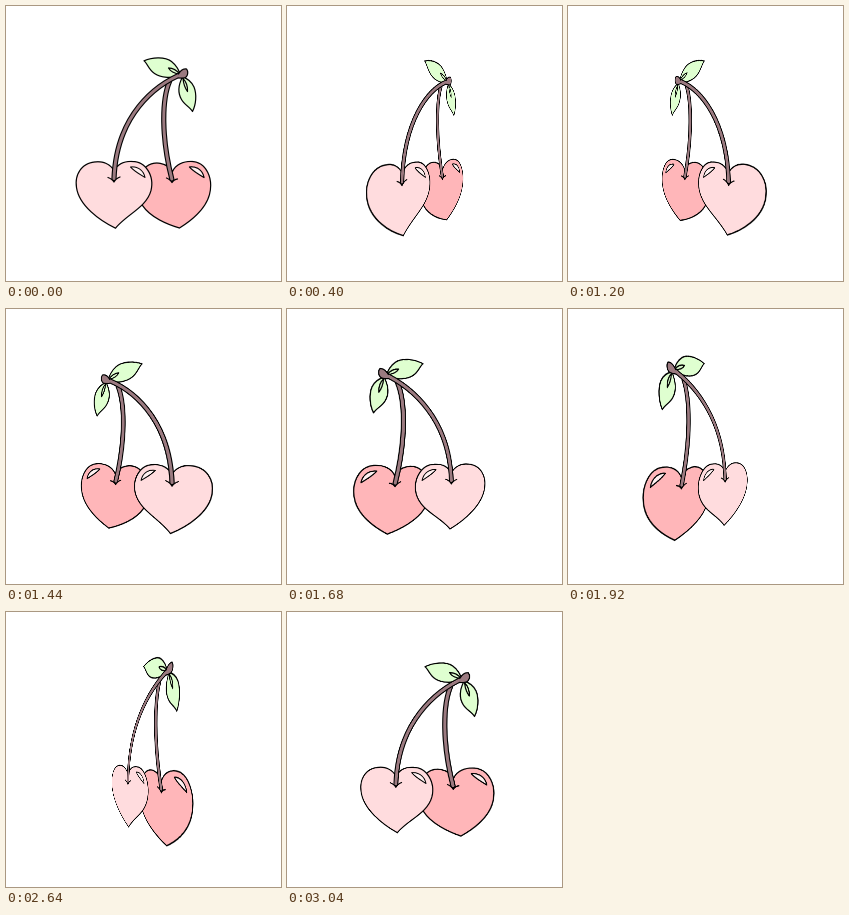
These frames come from a looping animation (275 px wide and 275 px high, 3120 ms). An HTML page:

```html
<!DOCTYPE html>
<html lang="en">
<head>
<meta charset="utf-8">
<title>Turning cherries</title>
<style>
  html, body { margin: 0; width: 100%; height: 100%; overflow: hidden; background: #fff; }
  .stage { position: relative; left: -1px; width: 275px; height: 275px; perspective: 245px; }
  /* Drawn at double size and halved in the transform, for crisp edges. */
  svg {
    position: absolute; left: -137.5px; top: -137.5px; width: 550px; height: 550px;
    transform: scale(.5); will-change: transform;
    fill: none; stroke: #000; stroke-width: 1.2; stroke-linecap: round; stroke-linejoin: round;
  }
  .light { fill: #ffdcde; }
  .dark { fill: #ffb6b9; }
  .leaf { fill: #dfffd0; }
  .shine { fill: #fff1f1; stroke-width: 1; }
  .rim { stroke-width: 5.2; }
  .bark { stroke: #9b7a80; stroke-width: 3; }
  .knob { fill: #9b7a80; }
</style>
</head>
<body>
<div class="stage">
  <svg id="cherries" viewBox="0 0 275 275">
    <defs>
      <path id="shortStem" d="M164 75C156 94 156 132 166.300 172.500"/>
      <path id="longStem" d="M179 66.500C149 78 111 109 108.500 172"/>
      <path id="shine" d="M125 160.500C131 159.500 138 163 139.500 171C135 168 129.500 165.500 125 160.500Z"/>
    </defs>

    <path class="leaf" d="M138.500 54.300C146 51 159 49.500 166 55C171 59 173 63 175 68.500C165 72.500 155 71 149 67C143 63 142 57 138.500 54.300Z"/>
    <path d="M174 67.500C171 63.500 167 61.500 163 61.500C165 65 169 67 174 67.500"/>
    <path class="leaf" d="M177 70.500C172.500 79 172.500 87 176 93C179 98.500 184 100 187 105C190.500 98 191.500 88 188.500 80.500C186 75 182 72 177 70.500Z"/>
    <path d="M177.500 72C178 77 179 81 182 85C182.500 80 180.500 75 177.500 72"/>

    <path class="dark" d="M167 165C161 156 149 154 141 160C130 168 129 186 137 199C145 211 162 218 174 221.500C186 214 200 203 204 188C208 172 201 156 187 155C178 154.500 170 158 167 165Z"/>
    <use href="#shine" x="59"/>
    <use href="#shine" class="shine" x="59"/>
    <use href="#shortStem" class="rim"/>
    <use href="#shortStem" class="bark"/>
    <path d="M161 171.500Q164.500 173 166.500 176Q168.500 173 172 172.500"/>

    <path class="light" d="M109 165C105 157 97 154.500 89 155.500C76 157 69 168 71 181C73.500 199 94 214 110 221.700C121 208 141 201 145.500 184C149 169 140 155 127 155C118 154.500 111 158 109 165Z"/>
    <use href="#shine" class="shine"/>
    <use href="#longStem" class="rim"/>
    <use href="#longStem" class="bark"/>
    <path class="knob" d="M173 67.500C175 64 178 62 181 62.500C183 65 182.500 69 180 71C178 72 175 71.500 172.500 71.500"/>
    <path d="M102.500 171Q106.500 172.500 108.500 175.500Q110.500 172 114.500 170.500"/>
  </svg>
</div>
<script>
  const FRAMES = 39, STEP = 80;
  const turn = deg => ({ transform: `rotateY(${deg}deg) scale(.5)` });
  document.getElementById("cherries").animate([turn(0), turn(360)], {
    duration: FRAMES * STEP,
    iterations: Infinity,
    easing: `steps(${FRAMES}, end)`
  });
</script>
</body>
</html>
```
